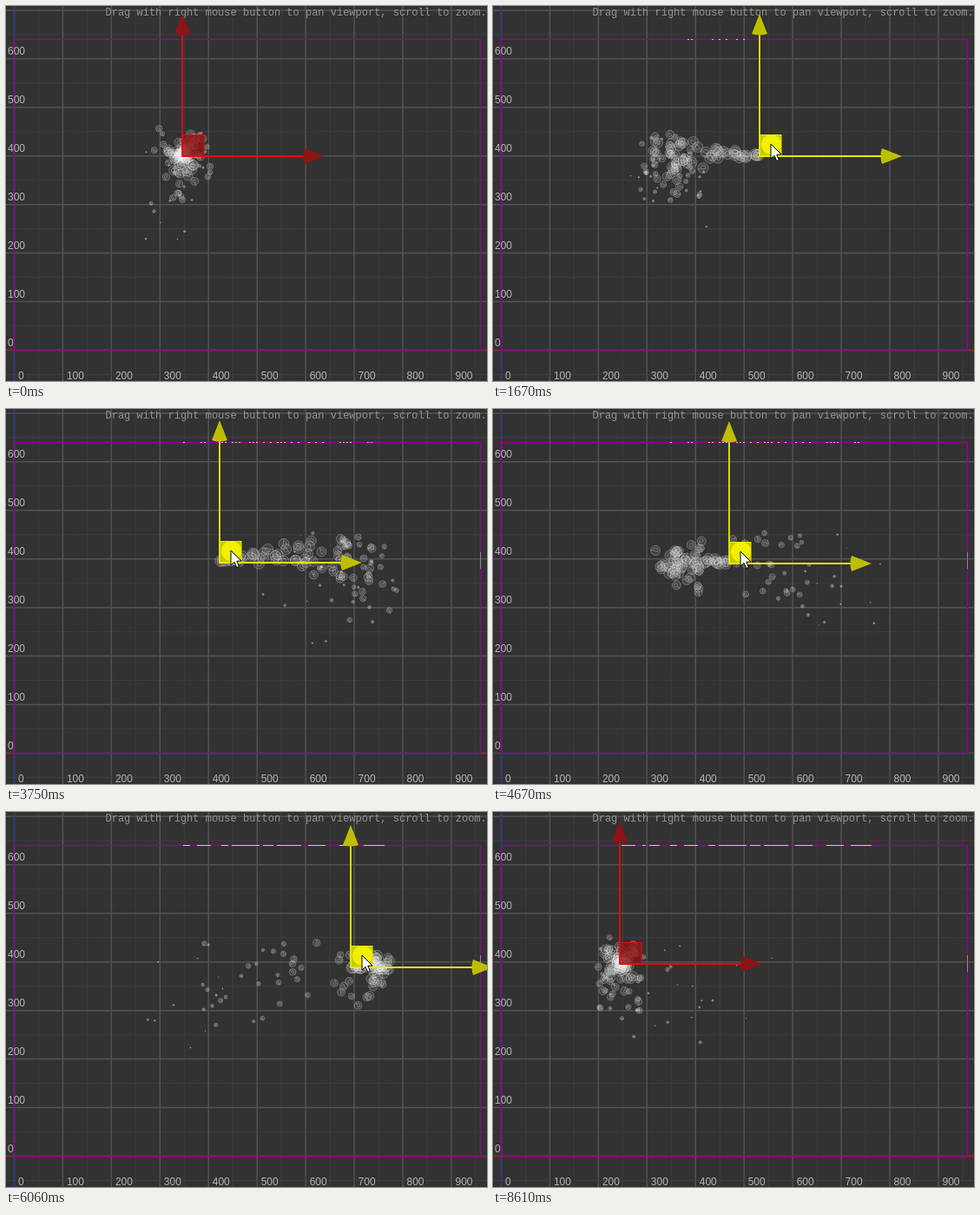
An HTML page with a canvas that plays this animation: 554 by 432 pixels, repeating every 8.68 s.

```html
<!DOCTYPE html>
<html lang="en">
<head>
<meta charset="utf-8">
<title>Particle emitter</title>
<style>
html, body { margin: 0; width: 100%; height: 100%; overflow: hidden; background: #323232; }
canvas { display: block; }
</style>
</head>
<body>
<canvas id="stage" width="554" height="432"></canvas>
<script>
const W = 554, H = 432, LOOP = 8680, STEPS = 113, STEP = LOOP / STEPS, TAU = Math.PI * 2;
const ctx = document.getElementById('stage').getContext('2d');

// World to screen
const UNIT = 0.5594, X0 = 9.5, Y0 = 396.5;

// Emitter path: [ms, position]
const pathX = [[0, 203], [1060, 203], [1350, 246], [1670, 306], [1830, 324], [2300, 404],
  [2600, 419], [2880, 400], [3300, 336], [3750, 246], [4200, 200], [4670, 272], [5200, 411],
  [5550, 430], [5780, 425], [6060, 396], [6500, 313], [7210, 153], [7370, 146], [LOOP, 146]];
const pathY = [[0, 172.5], [1060, 172.5], [1670, 173.5], [2500, 171.5], [3000, 169], [3450, 171],
  [3750, 177], [4670, 178], [6060, 179], [7210, 175], [7370, 174.5], [LOOP, 174.5]];

const secant = (k, i) => (k[i + 1][1] - k[i][1]) / (k[i + 1][0] - k[i][0]);

function slope(k, i) {
  if (i === 0 || i === k.length - 1) return 0;
  const a = secant(k, i - 1), b = secant(k, i);
  return a * b > 0 ? 2 * a * b / (a + b) : 0;
}

// Monotone cubic interpolation
function along(k, t) {
  if (t <= k[0][0]) return k[0][1];
  let i = 0;
  while (i < k.length - 2 && t > k[i + 1][0]) i++;
  const d = k[i + 1][0] - k[i][0], u = Math.min(1, (t - k[i][0]) / d), v = 1 - u;
  return k[i][1] * (1 + 2 * u) * v * v + k[i + 1][1] * u * u * (3 - 2 * u)
    + d * (slope(k, i) * u * v * v - slope(k, i + 1) * u * u * v);
}

function rand(i, salt) {
  let h = Math.imul(i + 7001, 374761393) + Math.imul(salt + 1, 668265263);
  h = Math.imul(h ^ (h >>> 13), 1274126177);
  return ((h ^ (h >>> 16)) >>> 0) / 4294967296;
}

function line(x1, y1, x2, y2, color, width = 1) {
  ctx.strokeStyle = color;
  ctx.lineWidth = width;
  ctx.beginPath();
  ctx.moveTo(x1, y1);
  ctx.lineTo(x2, y2);
  ctx.stroke();
}

function drawGrid() {
  ctx.fillStyle = '#323232';
  ctx.fillRect(0, 0, W, H);
  for (const [odd, color, width] of [[1, '#3d3d3d', 1], [0, '#525252', 1.5]]) {
    for (let n = odd; n < 20; n += 2) {
      const d = n * 50 * UNIT;
      line(X0 + d, 0, X0 + d, H, color, width);
      line(0, Y0 - d, W, Y0 - d, color, width);
    }
  }
  line(0, 424.5, W, 424.5, '#3d3d3d');
  line(0, Y0, W, Y0, '#a02020');
  line(X0, 0, X0, H, '#34348c', 1.5);
  ctx.strokeStyle = '#960096';
  ctx.lineWidth = 1.3;
  ctx.strokeRect(X0, 38.5, 537, 358);
}

function drawLabels() {
  ctx.fillStyle = '#b4b4b4';
  ctx.font = '12px "Liberation Sans", Arial, sans-serif';
  for (let n = 0; n < 10; n++) {
    const d = n * 100 * UNIT;
    ctx.fillText(n * 100, X0 + 4.5 + d, 430);
    if (n < 8) ctx.fillText(n * 100, 2, Y0 - 4.7 - d);
  }
  ctx.fillStyle = '#949494';
  ctx.font = '12px "Courier New", "Liberation Mono", monospace';
  ctx.fillText('Drag with right mouse button to pan viewport, scroll to zoom.', 114.5, 11);
}

// Pale dashes left on the frame where the arrows have crossed it
function drawScuffs(t) {
  if (t < 1060) return;
  let lo = 201, hi = 203;
  for (let s = 1060; s <= t; s += 40) {
    const x = along(pathX, s);
    lo = Math.min(lo, x + (s > 7300 ? 0 : 6));
    hi = Math.max(hi, x + 9 * Math.min(1, Math.max(0, (s - 1800) / 600)) - 4);
  }
  const density = t < 2000 ? 0.3 : t < 5000 ? 0.45 : 0.68;
  ctx.fillStyle = '#d2c8d2';
  for (let x = Math.ceil(lo / 4) * 4; x < hi; x += 4) {
    if (rand(x, 9) < density) ctx.fillRect(x, 38, t < 5000 ? 2 : 4, 1);
  }
  if (t > 2400) {
    ctx.fillStyle = '#8c8c8c';
    ctx.fillRect(546, 165, 1, 19);
  }
}

function drawParticles(t) {
  const gap = 18;
  ctx.fillStyle = '#fff';
  ctx.strokeStyle = '#fff';
  ctx.lineWidth = 0.9;
  for (let i = Math.ceil((t - 2100) / gap); i * gap <= t; i++) {
    const born = i * gap, life = 1600 + 500 * rand(i, 0), age = (t - born) / 1000;
    const u = age * 1000 / life;
    if (u >= 1) continue;
    const r = 6.4 * (1 - Math.pow(u, 1.7));
    const x = along(pathX, born) + (rand(i, 1) - 0.5) * 6 + (rand(i, 2) - 0.5) * 54 * age;
    const y = along(pathY, born) + (rand(i, 3) - 0.5) * 6 + (rand(i, 4) * 70 - 43) * age + 16 * age * age;
    ctx.globalAlpha = 0.09;
    ctx.beginPath();
    ctx.arc(x, y, r, 0, TAU);
    ctx.fill();
    ctx.globalAlpha = 0.3;
    ctx.stroke();
    // Inner facets
    const turn = rand(i, 5) * TAU;
    ctx.beginPath();
    ctx.arc(x, y, r * 0.5, turn, turn + 3.6);
    ctx.lineTo(x + r * Math.cos(turn), y + r * Math.sin(turn));
    ctx.stroke();
  }
  ctx.globalAlpha = 1;
}

function drawHead(x, y, angle, color) {
  ctx.save();
  ctx.translate(x, y);
  ctx.rotate(angle);
  ctx.fillStyle = color;
  ctx.beginPath();
  ctx.moveTo(164, 0);
  ctx.lineTo(141, 9);
  ctx.quadraticCurveTo(138, 0, 141, -9);
  ctx.fill();
  ctx.restore();
}

function drawGizmo(x, y, hot) {
  const edge = hot ? '#eaea00' : '#e60a0a', head = hot ? '#bebe00' : '#8c1414';
  ctx.fillStyle = hot ? '#c8c800' : 'rgba(145,18,18,.82)';
  ctx.fillRect(x, y - 25, 25, 25);
  ctx.strokeStyle = edge;
  ctx.lineWidth = 1;
  ctx.strokeRect(x + 0.5, y - 24.5, 24.5, 24);
  if (hot) {
    ctx.fillStyle = '#f0f000';
    ctx.beginPath();
    ctx.arc(x + 13.5, y - 13.5, 11.5, 0, TAU);
    ctx.fill();
  }
  line(x, y + 0.8, x, y - 142, edge, 1.8);
  line(x, y, x + 142, y, edge, 1.8);
  drawHead(x, y, 0, head);
  drawHead(x, y, -Math.PI / 2, head);
}

function drawCursor(x, y) {
  const outline = [[0, 0], [0, 17], [4, 13.3], [6.8, 19.5], [9.4, 18.4], [6.8, 12.3], [12, 12]];
  ctx.beginPath();
  for (const [dx, dy] of outline) ctx.lineTo(x + dx, y + dy);
  ctx.closePath();
  ctx.fillStyle = '#fff';
  ctx.strokeStyle = '#000';
  ctx.lineWidth = 1;
  ctx.fill();
  ctx.stroke();
}

function cursorAt(t, x, y) {
  const hx = x + 13, hy = y - 14;
  const glide = (fx, fy, p) => {
    const e = p * p * (3 - 2 * p);
    return [fx + (hx - fx) * e, fy + (hy - fy) * e];
  };
  if (t < 140 || t > 8260) return null;
  if (t < 900) return glide(416, 407, (t - 140) / 760);
  if (t > 7600) return glide(290, 407, (8260 - t) / 660);
  return [hx, hy];
}

function draw(now) {
  // The picture advances in steps, each turning over slightly early
  const step = Math.min(STEPS - 1, Math.floor(now % LOOP / STEP + 0.3));
  const t = Math.max(0, (step - 0.18) * STEP);
  const x = Math.round(along(pathX, t)), y = Math.round(along(pathY, t));
  const cursor = cursorAt(t, x, y);
  const hot = cursor && cursor[0] < x + 25 && cursor[1] < y;
  drawGrid();
  drawScuffs(t);
  drawLabels();
  drawParticles(t);
  drawGizmo(x, y, hot);
  if (cursor) drawCursor(...cursor);
}

const start = performance.now();
function tick() {
  draw(performance.now() - start);
  requestAnimationFrame(tick);
}
tick();
</script>
</body>
</html>
```
